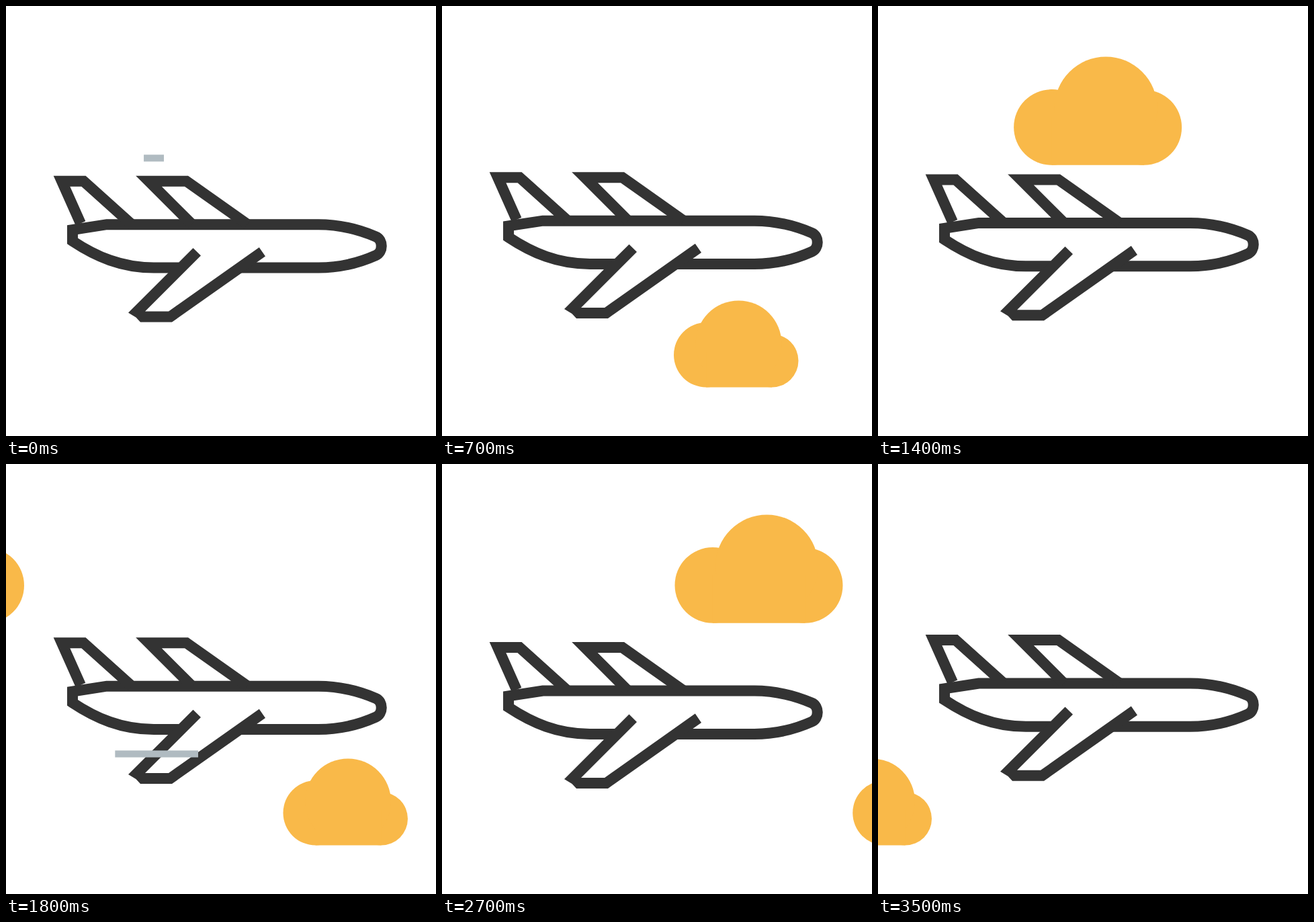
These frames come from a looping animation (640x640 px, 3600 ms). An HTML page:

```html
<!DOCTYPE html>
<html lang="en">
<head>
<meta charset="utf-8">
<title>Plane</title>
<style>
  html, body { margin: 0; width: 100%; height: 100%; overflow: hidden; background: #fff; }
  svg { display: block; width: 100%; height: 100%; }
</style>
</head>
<body>
<svg viewBox="0 0 640 640">
  <g fill="#f9b949">
    <g id="bigCloud">
      <circle cx="56.3" cy="180.4" r="56.3"/>
      <circle cx="194" cy="180.7" r="56"/>
      <circle cx="137" cy="152" r="76.5"/>
      <path d="M56.3 165H194V236.7H56.3Z"/>
    </g>
    <g id="smallCloud">
      <circle cx="48.2" cy="519.3" r="48.2"/>
      <circle cx="146" cy="528" r="39.5"/>
      <circle cx="96.5" cy="502.5" r="64"/>
      <path d="M48.2 515H146V567.5H48.2Z"/>
    </g>
  </g>
  <g id="plane" fill="none" stroke="#333" stroke-width="16" stroke-miterlimit="10">
    <path d="M257 389.5H220C172 389.5 134 373 99 349.8V333L150 325.2H465C497 325.2 524 332 550.5 343.3C561.5 348 561.5 366.4 550.5 371.1C524 383 497 389.5 465 389.5H347"/>
    <path d="M111 323.5L83 260.7H115.5L187 325"/>
    <path d="M276.8 325L212.5 260.7H268.5L359.5 325"/>
    <path fill="#333" stroke="none" d="M278.5 360.2L182 456.5L193.5 463.5L200 470.5H247L386 372.5L376.8 359.2L242 454.5H207L290 371.5Z"/>
  </g>
  <g id="streaks" fill="#b0bbc1"></g>
</svg>
<script>
const LOOP = 3600, STEP = 100, STREAK = 151;
const byId = id => document.getElementById(id);

// Smooth curve through [time, value] points, straight beyond both ends.
function track(points) {
  const last = points.length - 1;
  const secant = i => (points[i + 1][1] - points[i][1]) / (points[i + 1][0] - points[i][0]);
  const slopes = points.map((p, i) => {
    if (i === 0) return secant(0);
    if (i === last) return secant(last - 1);
    const before = p[0] - points[i - 1][0], after = points[i + 1][0] - p[0];
    return (secant(i - 1) * after + secant(i) * before) / (before + after);
  });
  return t => {
    if (t <= points[0][0]) return points[0][1] + slopes[0] * (t - points[0][0]);
    if (t >= points[last][0]) return points[last][1] + slopes[last] * (t - points[last][0]);
    const i = points.findIndex(p => p[0] > t) - 1;
    const [t0, a] = points[i], [t1, b] = points[i + 1];
    const h = t1 - t0, u = (t - t0) / h, v = 1 - u;
    return v * v * (1 + 2 * u) * a + u * u * (3 - 2 * u) * b
      + h * u * v * (v * slopes[i] - u * slopes[i + 1]);
  };
}

const smooth = (from, to, t) => {
  const u = Math.min(1, Math.max(0, (t - from) / (to - from)));
  return u * u * (3 - 2 * u);
};

// Times are in tenths of a second.
const planeY = track([[-1, 1.3], [0, 0], [4, -2.7], [10, -7], [18, 5.5], [23, 14.8], [31, 6.2], [35, 1.3], [36, 0], [40, -2.7]]);
const smallX = track([[4, 545], [6, 412.5], [7, 345], [10, -3.5], [11, -105.5]]);
const bigFirst = track([[7, 640], [10, 499], [18, -223], [19, -350]]);
const bigSecond = track([[23, 588], [24, 538.5], [31, 9], [34, -291]]);

const streaks = [
  { start: -1, right: 235, y: 221.3 },
  { start: 7, right: 265, y: 500.4 },
  { start: 15.45, right: 286, y: 426.4 }
].map(streak => {
  const bar = document.createElementNS("http://www.w3.org/2000/svg", "rect");
  bar.setAttribute("y", streak.y);
  bar.setAttribute("height", 10.2);
  byId("streaks").append(bar);
  return { ...streak, bar };
});

const move = (id, x, y) => byId(id).setAttribute("transform", `translate(${x} ${y})`);

function draw(t) {
  move("plane", 0, planeY(t));
  move("smallCloud", smallX(t % 12), 0);
  move("bigCloud", t < 20 ? bigFirst(t) : bigSecond(t), 0);
  for (const { start, right, bar } of streaks) {
    const head = smooth(start, start + 3.5, t);
    const tail = smooth(start + 2.8, start + 6.3, t);
    bar.setAttribute("x", right - STREAK * head);
    bar.setAttribute("width", STREAK * (head - tail));
  }
}

const begin = performance.now();
function tick() {
  const elapsed = (performance.now() - begin) % LOOP;
  draw(Math.floor(elapsed / STEP));
  requestAnimationFrame(tick);
}
tick();
</script>
</body>
</html>
```
